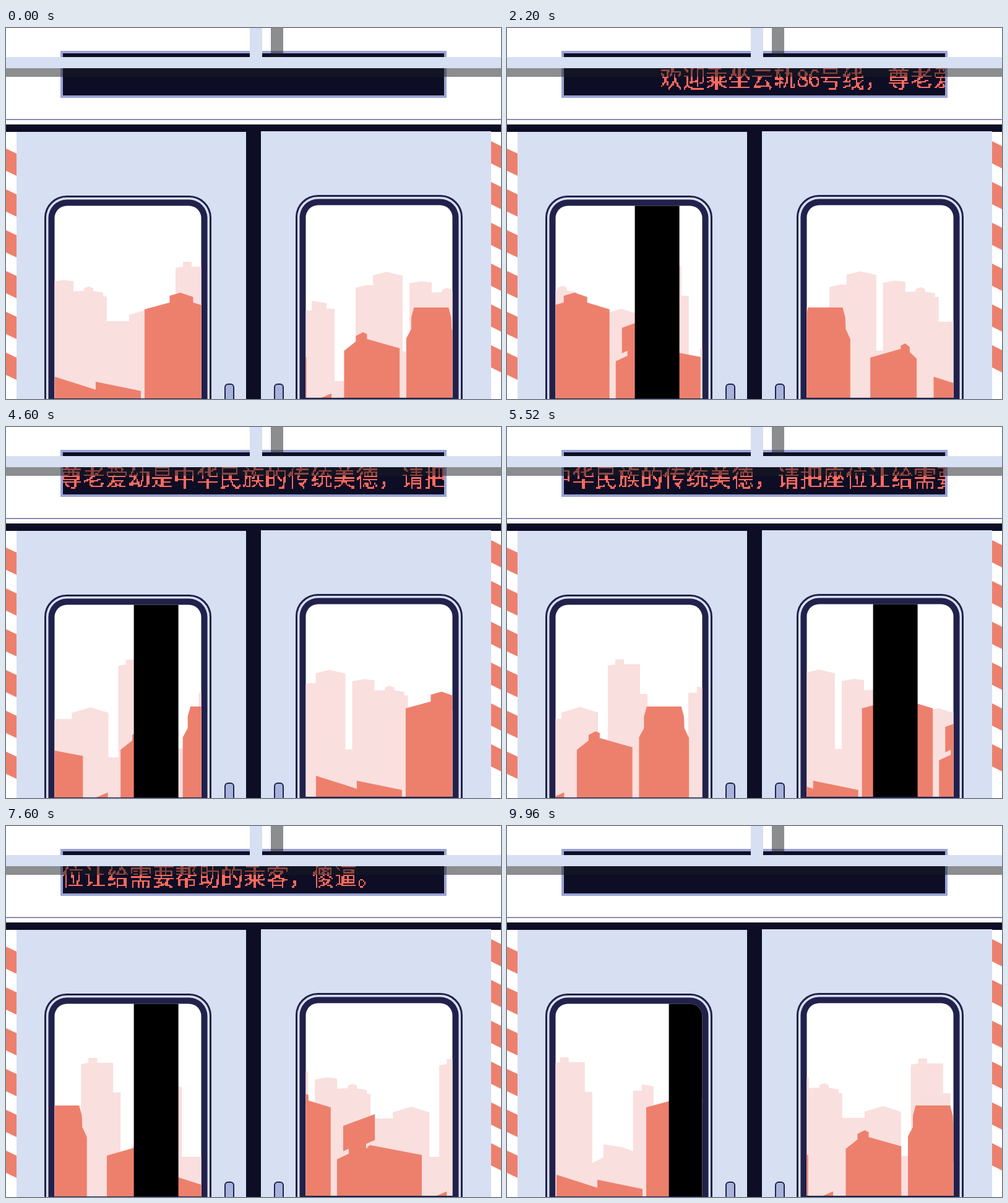
An HTML page with a canvas for the animation above (10000 ms loop, 800 px wide and 600 px high).

```html
<!DOCTYPE html>
<html lang="zh">
<head>
<meta charset="utf-8">
<style>
  html, body { margin: 0; width: 100%; height: 100%; overflow: hidden; background: #fff; }
  canvas { display: block; }
</style>
</head>
<body>
<canvas id="stage" width="800" height="600"></canvas>
<script>
const ctx = document.getElementById('stage').getContext('2d');
const LOOP = 10000;
const INK = '#0d0d26', FRAME = '#21214b', PALE = '#d7dff2', CORAL = '#ed806d';
const PINK = '#f9dfde', LED = '#ff6a5c', SHADE = 'rgba(26,28,33,.5)';
const MESSAGE = '欢迎乘坐云轨86号线，尊老爱幼是中华民族的传统美德，请把座位让给需要帮助的乘客，傻逼。';

// Skylines, one tile each
const farCity = new Path2D(`M-101 640V455H-85V439L-61 443V452H-48V569H-14V418L3 414H14V398
  L36 392.5 62 398.5V521H73V411L93 407.5 109 409.5V426L126 425V421L134 418 141 421V425.5L157 428V434H163
  V474H199V464L229 455 258 464V536H274V388L286 386V378H300V386H326V434H338V549L356 540V519
  L385 523 404 530V432H418V422L437 425V538H478V640Z`);
const nearCity = new Path2D(`M-23.3 640V533L25.7 519V514L33 510 40.5 516V524L51.7 535V640Z
  M79 640V564L145 585V572L218 587V640Z
  M224 640V455L264.5 444V433L282 428 302.5 435V444L338.5 455V640Z
  M348.6 640V539L367.6 530V522L358.6 526V485L409.8 466V508L395.6 514V522L401.6 516 485.7 532V640Z
  M505 600L526 591V640H505Z
  M546.5 640V522L565.5 507V498L577 492 583.5 495V503L636.3 518V640Z
  M647 640V502L655 487V468L659.5 452H715.3L719.5 468 720.3 487 727.7 503V640Z`);

const SCALE = 2.3;
const sign = makeSign(MESSAGE);

// Renders the message as hard-edged 16 px dots
function makeSign(text) {
  const c = document.createElement('canvas');
  c.width = 16 * text.length;
  c.height = 20;
  const g = c.getContext('2d');
  g.font = '16px "Noto Sans CJK SC", "Noto Sans CJK", sans-serif';
  g.fillStyle = LED;
  let x = 0;
  for (const ch of text) {
    g.fillText(ch, x, 14);
    x += /\d/.test(ch) ? 8 : 16;
  }
  const dots = g.getImageData(0, 0, c.width, c.height);
  for (let i = 0; i < dots.data.length; i += 4) {
    const on = dots.data[i + 3] > 115;
    dots.data.set(on ? [255, 106, 92, 255] : [0, 0, 0, 0], i);
  }
  g.putImageData(dots, 0, 0);
  return c;
}

function rect(color, x, y, w, h) {
  ctx.fillStyle = color;
  ctx.fillRect(x, y, w, h);
}

function rounded(x, y, w, h, r) {
  ctx.beginPath();
  ctx.roundRect(x, y, w, h, r);
}

function drawTile(path, color, x, y) {
  ctx.save();
  ctx.translate(x, y);
  ctx.fillStyle = color;
  ctx.fill(path);
  ctx.restore();
}

function drawScenery(t) {
  rect('#fff', 0, 200, 800, 400);
  for (const k of [0, 1]) drawTile(farCity, PINK, k * 579 - t * 0.0201, k * 2 - t * 0.0004);
  for (const k of [0, 1]) drawTile(nearCity, CORAL, k * 783.3 - t * 0.07854, 0);
  const pillar = 758 - (t % 600) * 1.375;
  for (const k of [0, 1]) rect('#000', pillar - k * 825, 200, 72, 400);
}

function drawDoor(x, y, w, windowX, handleX, t) {
  rect(PALE, x, y, w, 600);
  rounded(windowX + 1.5, y + 104.5, 267, 400, 34.5);
  ctx.strokeStyle = FRAME;
  ctx.lineWidth = 3;
  ctx.stroke();
  rounded(windowX + 6.5, y + 109.5, 257, 400, 30);
  ctx.fillStyle = FRAME;
  ctx.fill();

  ctx.save();
  rounded(windowX + 16.5, y + 119.5, 237, 311.5, [20, 20, 0, 0]);
  ctx.clip();
  drawScenery(t);
  ctx.restore();

  rounded(handleX + 1, 576, 14, 60, 5);
  ctx.fillStyle = '#a8b3dc';
  ctx.fill();
  ctx.lineWidth = 2;
  ctx.stroke();
}

function drawStripes(x, y, w) {
  ctx.fillStyle = CORAL;
  for (let i = 0; i < 6; i++, y += 66) {
    ctx.beginPath();
    ctx.moveTo(x, y);
    ctx.lineTo(x + w, y + 8);
    ctx.lineTo(x + w, y + 44);
    ctx.lineTo(x, y + 36);
    ctx.fill();
  }
}

function drawPanel(t) {
  rect('#9aa4d5', 88, 37, 624, 76);
  rect(INK, 92, 41, 616, 68);
  ctx.save();
  ctx.beginPath();
  ctx.rect(92, 41, 616, 68);
  ctx.clip();
  ctx.imageSmoothingEnabled = false;
  ctx.drawImage(sign, 731 - t * 0.22, 62.8, sign.width * SCALE, sign.height * SCALE);
  ctx.restore();
}

function drawRails() {
  rect(SHADE, 428, 0, 20, 47);
  rect(SHADE, 0, 65, 800, 14);
  rect(PALE, 394, 0, 20, 47);
  rect(PALE, 0, 47, 800, 18);
}

function draw(t) {
  rect('#fff', 0, 0, 800, 600);
  rect('#8c8ab6', 0, 147, 800, 2);
  rect(INK, 0, 156, 800, 12);
  rect(INK, 388, 156, 24, 444);
  drawStripes(0, 195, 17);
  drawStripes(784, 183, 16);
  drawDoor(17, 168, 371, 62, 353, t);
  drawDoor(412, 167, 372, 468, 433, t);
  drawPanel(t);
  drawRails();
}

const start = performance.now();
function tick() {
  draw((performance.now() - start) % LOOP);
  requestAnimationFrame(tick);
}
tick();
</script>
</body>
</html>
```
